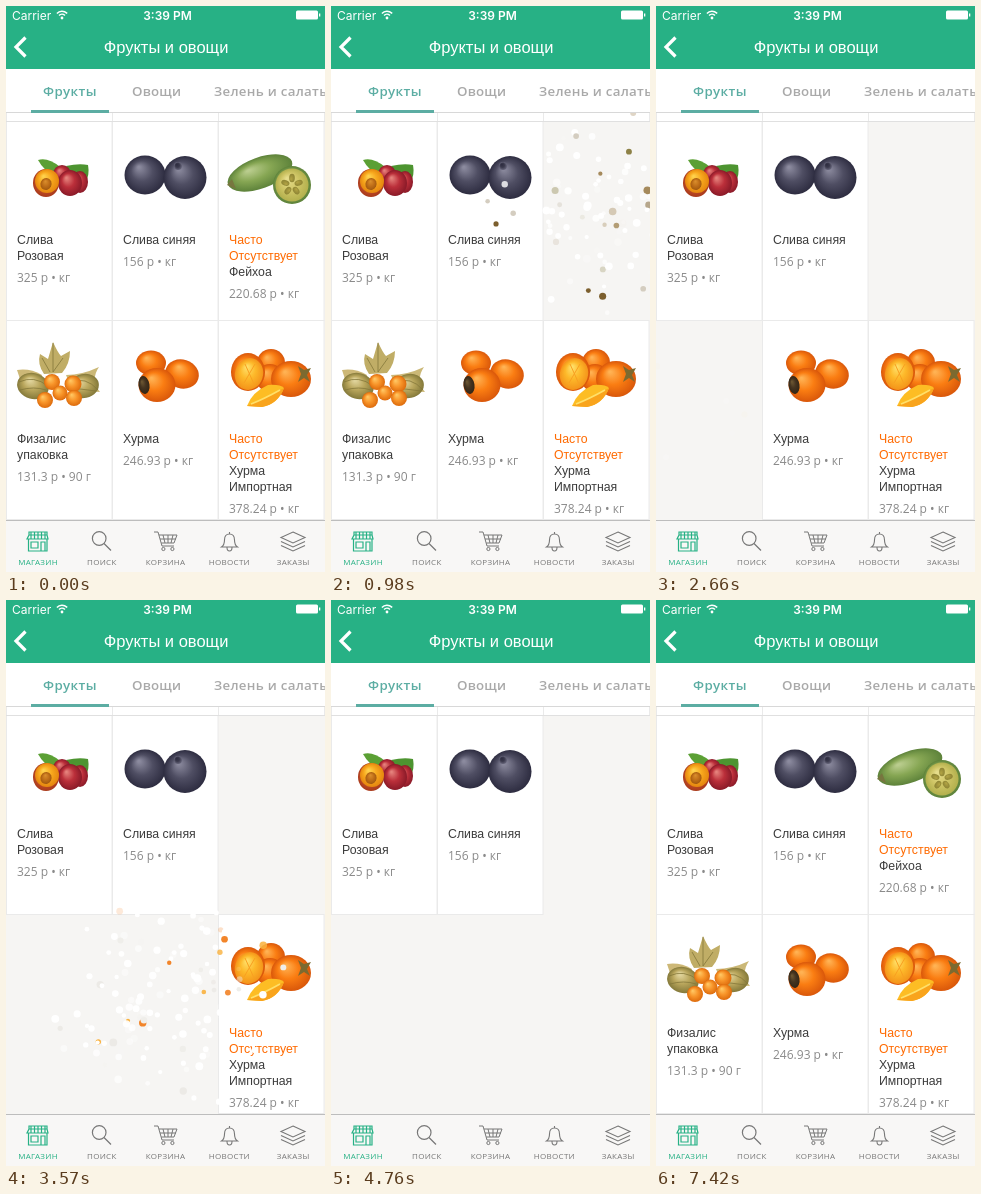
Recreate the animation shown at these times as an HTML page with a canvas. Size 319x566 px, loop 7.56 s.

```html
<!DOCTYPE html>
<html lang="ru">
<head>
<meta charset="utf-8">
<title>Фрукты и овощи</title>
<style>
html, body { margin: 0; width: 100%; height: 100%; overflow: hidden; background: #f6f5f3; }
canvas { display: block; width: 319px; height: 566px; }
</style>
</head>
<body>
<canvas id="stage"></canvas>
<script>
const W = 319, H = 566, LOOP = 7560, STEP = 70;
const SHAKE = 140, SHRINK = 70, FLIGHT = 1000;
const FADE_IN = 7126, FADE_MS = 294;
const GREEN = '#27b185', TEAL = '#5cada3', ORANGE = '#ff6a00', LINE = '#eaeaea';

const canvas = document.getElementById('stage');
const dpr = window.devicePixelRatio || 1;
canvas.width = W * dpr;
canvas.height = H * dpr;
const c = canvas.getContext('2d');
c.scale(dpr, dpr);

function randomizer(seed) {
  return () => {
    seed = (seed + 0x6D2B79F5) | 0;
    let n = Math.imul(seed ^ (seed >>> 15), 1 | seed);
    n = (n + Math.imul(n ^ (n >>> 7), 61 | n)) ^ n;
    return ((n ^ (n >>> 14)) >>> 0) / 4294967296;
  };
}

function text(str, x, y, font, color, align = 'left', spacing = 0) {
  c.font = font;
  c.fillStyle = color;
  c.textAlign = align;
  c.letterSpacing = spacing + 'px';
  c.fillText(str, x, y);
}

function rect(x, y, w, h, color) {
  c.fillStyle = color;
  c.fillRect(x, y, w, h);
}

function shape(path, fill, stroke, width = 1) {
  const p = new Path2D(path);
  if (fill) { c.fillStyle = fill; c.fill(p); }
  if (stroke) { c.strokeStyle = stroke; c.lineWidth = width; c.stroke(p); }
}

function disc(x, y, r, color) {
  c.fillStyle = color;
  c.beginPath();
  c.arc(x, y, r, 0, 7);
  c.fill();
}

// Shaded ellipse lit from the upper left
function ball(x, y, rx, ry, [light, mid, dark], turn = 0) {
  c.save();
  c.translate(x, y);
  c.rotate(turn);
  c.scale(rx, ry);
  const g = c.createRadialGradient(-.3, -.4, .05, 0, 0, 1);
  g.addColorStop(0, light);
  g.addColorStop(.5, mid);
  g.addColorStop(1, dark);
  disc(0, 0, 1, g);
  c.restore();
}

const RED = ['#e5827c', '#bb2f3a', '#8a1a28'];
const AMBER = ['#ffd24d', '#f8a91e', '#e5860f'];
const BLUE = ['#8b8a9e', '#4f4e63', '#2d2c40'];
const LEAF = ['#b9cc8d', '#86a653', '#5d823a'];
const HUSK = ['#e3d7a0', '#b9a65c', '#84793a'];
const BERRY = ['#ffc662', '#f8952a', '#dd6b0c'];
const TANGERINE = ['#ffb253', '#fa7d12', '#d9570a'];
const HONEY = ['#ffe06a', '#fdb92a', '#f4941a'];

// Fruit pictures, relative to the card corner
function redPlums() {
  shape('M32 39 Q42 36 54 46 L48 54 Q38 50 32 39Z', '#5ba034');
  shape('M60 45 Q73 42 82 44 Q84 54 79 62 L64 54Z', '#4d9430');
  ball(56, 53, 9, 9, RED);
  ball(74, 61, 8, 11, RED);
  ball(64, 62, 12, 13, RED);
  ball(40, 62, 13, 14, ['#e08a35', '#c9552a', '#a93a1c']);
  ball(41, 60, 12, 12, AMBER);
  ball(40, 63, 5.5, 6, ['#d98e2c', '#c3721a', '#a3590f'], .4);
}

function bluePlums() {
  ball(33, 54, 20.5, 19.5, BLUE);
  ball(73, 56.5, 21.5, 21.5, BLUE);
  ball(66, 45, 4, 4, ['#2d2c40', '#3a394c', '#66657a']);
}

function feijoa() {
  ball(42, 52, 34, 15.5, LEAF, -.35);
  shape('M9 64 L14 58 L18 68Z', '#77763f');
  ball(74, 64, 19, 19, LEAF);
  ball(74, 64, 16.5, 16.5, ['#e6dd8c', '#d0c667', '#b3b04d']);
  for (let i = 0; i < 5; i++) {
    const a = i * 1.2566 - 1.57;
    ball(74 + 7 * Math.cos(a), 64 + 7 * Math.sin(a), 4.2, 2.8, ['#b3a445', '#a0943c', '#8d8434'], a);
  }
}

function physalis() {
  shape('M47 22 Q52 33 55 36 L64 31 Q64 44 56 53 L38 54 Q31 44 34 34 L42 39Z', '#c0ad66');
  shape('M11 50 Q24 48 36 55 L34 64 L15 62Z', '#cdb877');
  shape('M60 55 Q76 55 93 47 Q84 60 94 72 L66 70Z', '#cbb877');
  ball(27, 66, 16, 13, HUSK, .25);
  ball(78, 66, 15, 12, HUSK, -.2);
  shape('M47 23 L47 52 M57 38 L47 52 M36 38 L44 52 M13 62 Q28 55 42 66 M14 70 Q28 66 40 70 M64 62 Q80 56 92 70 M66 68 L90 71', null, '#85783a', .8);
  ball(46, 62, 8, 8, BERRY);
  ball(67, 64, 8.5, 8.5, BERRY);
  ball(54, 73, 7.5, 7.5, BERRY);
  ball(39, 80, 8, 8, BERRY);
  ball(68, 78, 8, 8, BERRY);
}

function persimmons() {
  ball(39, 43, 15, 12.5, TANGERINE);
  ball(70, 54, 17, 14.5, TANGERINE, .3);
  ball(45, 65, 18.5, 17, TANGERINE);
  ball(32, 65, 5.5, 9, ['#6b5632', '#453420', '#332616'], -.15);
}

function cutPersimmons() {
  ball(53, 43, 14, 14, TANGERINE);
  ball(52, 58, 14, 14, TANGERINE);
  ball(73, 59, 20, 18, TANGERINE);
  ball(30, 52, 17, 19, TANGERINE);
  ball(31, 54, 14, 16, HONEY, .3);
  shape('M27 44 L36 64 M37 44 L26 63', null, '#f9a021', 1);
  shape('M80 46 L86 50 L93 48 L89 55 L92 62 L86 58 L80 62 L83 54Z', '#7c6a30');
  shape('M29 86 Q34 72 50 65 Q62 64 66 68 Q60 84 44 87Z', '#fdbd24');
  shape('M29 86 Q44 80 66 68 Q60 84 44 87Z', '#f9a41c');
  shape('M33 84 Q46 79 62 70', null, '#ffe06a', 1.6);
}

const OFTEN = ['Часто', 'Отсутствует'];
const cards = [
  { col: 0, row: 0, name: ['Слива', 'Розовая'], price: '325 р • кг', fruit: redPlums },
  { col: 1, row: 0, name: ['Слива синяя'], price: '156 р • кг', fruit: bluePlums },
  { col: 2, row: 0, warn: OFTEN, name: ['Фейхоа'], price: '220.68 р • кг', fruit: feijoa,
    boom: 210, tones: ['#7c5f2e', '#8d8147', '#d4cdc0', '#a58a5c'] },
  { col: 0, row: 1, name: ['Физалис', 'упаковка'], price: '131.3 р • 90 г', fruit: physalis,
    boom: 1540, tones: ['#f7b51c', '#f2b422', '#d2cec7', '#fbc63c'] },
  { col: 1, row: 1, name: ['Хурма'], price: '246.93 р • кг', fruit: persimmons,
    boom: 2800, tones: ['#f2852a', '#f9b240', '#eceae6', '#efeeea'] },
  { col: 2, row: 1, warn: OFTEN, name: ['Хурма', 'Импортная'], price: '378.24 р • кг', fruit: cutPersimmons,
    boom: 3570, tones: ['#f2852a', '#fbb925', '#e6e4e0', '#f7a02a'] }
];

cards.forEach((card, i) => {
  card.x = card.col * 106;
  card.y = 115 + card.row * 199;
  if (card.boom) card.dots = makeDots(card, randomizer(71 + i * 13));
});

// A square grid of dots over the upper part of the card
function makeDots(card, rnd) {
  return Array.from({ length: 256 }, (_, i) => ({
    x: card.x + (i % 16 + .5) * 6.6,
    y: card.y + (Math.floor(i / 16) + .5) * 6.6,
    vx: (rnd() * 2 - 1) * 125,
    vy: (rnd() * 2 - 1) * 112,
    shrink: .9 * rnd(),
    life: .2 + .75 * rnd(),
    color: rnd() < .23 ? card.tones[Math.floor(rnd() * 4)] : '#fff'
  }));
}

function drawCard(card) {
  c.save();
  c.translate(card.x, card.y);
  rect(0, 0, 106, 200, '#fff');
  c.strokeStyle = LINE;
  c.lineWidth = 1;
  c.strokeRect(.5, .5, 105.5, 199);
  card.fruit();
  let y = 123;
  const line = color => str => {
    text(str, 11, y, '12.3px "Liberation Sans", Arial, sans-serif', color);
    y += 16;
  };
  (card.warn || []).forEach(line(ORANGE));
  card.name.forEach(line('#3c3c3c'));
  text(card.price, 11, y + 6, '12px "Open Sans", sans-serif', '#8a8a8a');
  c.restore();
}

function drawBooming(card, t) {
  const age = t - card.boom;
  if (t >= FADE_IN) {
    c.globalAlpha = Math.min(1, (t - FADE_IN) / FADE_MS);
    drawCard(card);
  } else if (age <= 0) {
    drawCard(card);
  } else if (age < SHAKE + SHRINK) {
    const k = Math.max(0, (age - SHAKE) / SHRINK);
    const jolt = age < SHAKE ? 4 : 0;
    const cx = card.x + 53, cy = card.y + 100;
    c.save();
    c.globalAlpha = 1 - k;
    c.translate(cx + jolt * Math.sin(age * 1.7), cy + jolt * Math.cos(age * 2.3));
    c.scale(1 - k * .99, 1 - k * .99);
    c.translate(-cx, -cy);
    drawCard(card);
    c.restore();
  }
  c.globalAlpha = 1;
}

function drawDots(card, t) {
  const p = (t - card.boom - SHAKE - SHRINK) / FLIGHT;
  if (p < 0 || p > 1) return;
  for (const d of card.dots) {
    if (p >= d.life) continue;
    c.globalAlpha = Math.min(1, (1 - p / d.life) / .25);
    disc(d.x + d.vx * p, d.y + d.vy * p + 90 * p * p, 4 * (1 - d.shrink * p), d.color);
  }
  c.globalAlpha = 1;
}

function drawHeader() {
  rect(0, 0, W, 63, GREEN);
  text('Carrier', 6, 13.5, '12px Inter, sans-serif', '#fff');
  text('3:39 PM', 161.5, 13.5, '600 12px Inter, sans-serif', '#fff', 'center');
  disc(56, 12, 1.4, '#fff');
  c.strokeStyle = '#fff';
  c.lineWidth = 1.5;
  for (const r of [4, 7]) {
    c.beginPath();
    c.arc(56, 12.2, r, -Math.PI * .76, -Math.PI * .24);
    c.stroke();
  }
  c.fillStyle = '#fff';
  c.beginPath();
  c.roundRect(290, 4.5, 22, 9, 1.5);
  c.fill();
  rect(313, 7.5, 1.3, 3, '#fff');
  shape('M19.5 31.5 L10 41 L19.5 50.5', null, '#fff', 3.2);
  text('Фрукты и овощи', 160, 47, '16.5px "Liberation Sans", Arial, sans-serif', '#fff', 'center');

  rect(0, 63, W, 43, '#fff');
  rect(0, 106, W, 1, '#d8d8d8');
  rect(25, 104, 78, 3, TEAL);
  const font = '600 13.3px "Open Sans", sans-serif';
  text('Фрукты', 37, 90, font, TEAL, 'left', .4);
  text('Овощи', 126, 90, font, '#a9a9a9', 'left', .2);
  text('Зелень и салаты', 208, 90, font, '#a9a9a9', 'left', .3);
}

function drawTabBar() {
  rect(0, 514, W, 52, '#f8f7f6');
  rect(0, 514, W, 1, '#bdbdbd');
  const gray = '#777';
  shape('M23 526 H41 V529 L42 533 H21 L23 529Z M23 529 H41 M25 526 V533 M28.5 526 V533 M32 526 V533 M35.5 526 V533 M39 526 V533 M22.5 533 V545 H41 V533 M25 536 H32 V542 H25Z M35 545 V536 H39 V545', null, GREEN, 1.2);
  shape('M100 532.5 A6.8 6.8 0 1 1 86.4 532.5 A6.8 6.8 0 1 1 100 532.5 M98 537.5 L105 544.5', null, gray, 1.2);
  shape('M148 526 H152 L156 540 H168 M153 529 H171 L168 537 H155.3 M157 529 L159 537 M162 529 V537 M167 529 L165 537 M154 533 H170 M159 543 A1.6 1.6 0 1 1 155.8 543 A1.6 1.6 0 1 1 159 543 M168 543 A1.6 1.6 0 1 1 164.8 543 A1.6 1.6 0 1 1 168 543', null, gray);
  shape('M223.5 526 V528 M215.5 541 Q218.5 539 218.5 534 Q218.5 528 223.5 528 Q228.5 528 228.5 534 Q228.5 539 231.5 541Z M221 541.5 Q221 545 223.5 545 Q226 545 226 541.5', null, gray, 1.1);
  shape('M287 526 L299 531.5 L287 537 L275 531.5Z M275 535.5 L287 541 L299 535.5 M275 539.5 L287 545 L299 539.5', null, gray, 1.1);
  ['МАГАЗИН', 'ПОИСК', 'КОРЗИНА', 'НОВОСТИ', 'ЗАКАЗЫ'].forEach((label, i) =>
    text(label, 32 + i * 63.8, 559, '8px "Open Sans", sans-serif', i ? '#777' : GREEN, 'center', .3));
}

function draw(t) {
  rect(0, 0, W, H, '#f6f5f3');
  c.save();
  c.beginPath();
  c.rect(0, 107, W, 407);
  c.clip();
  rect(0, 107, W, 8, '#fff');
  for (const x of [0, 106, 212, 318]) rect(x, 107, 1, 8, LINE);
  for (const card of cards) card.boom ? drawBooming(card, t) : drawCard(card);
  rect(0, 115, W, 1, '#e0e0e0');
  for (const card of cards) if (card.boom) drawDots(card, t);
  c.restore();
  drawHeader();
  drawTabBar();
}

let shown = -1;
const start = performance.now();
function tick() {
  const elapsed = Math.max(0, performance.now() - start) % LOOP;
  const t = Math.floor(elapsed / STEP) * STEP;
  if (t !== shown) draw(shown = t);
  requestAnimationFrame(tick);
}
tick();
</script>
</body>
</html>
```
